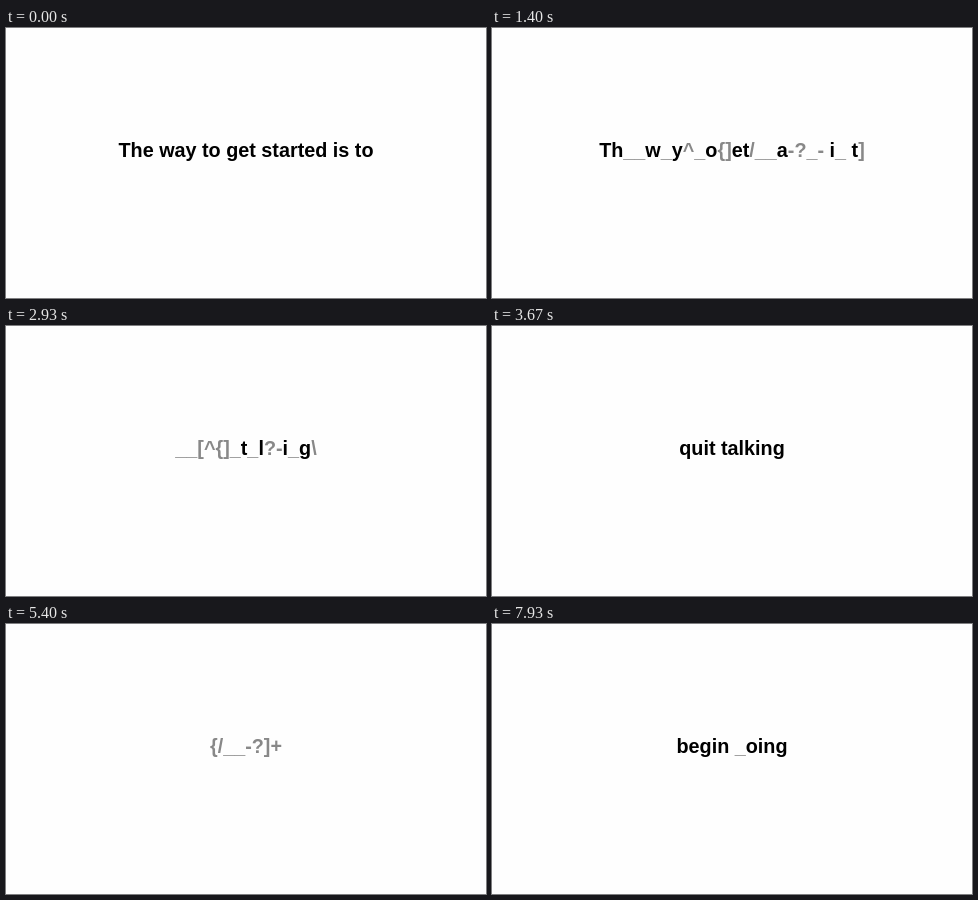
These frames come from a looping animation (480x270 px, 8 s). An HTML page:

```html
<!DOCTYPE html>
<html lang="en">
<head>
<meta charset="utf-8">
<title>Text scramble</title>
<style>
  html, body { margin: 0; width: 100%; height: 100%; overflow: hidden; background: #fefefe; }
  svg { display: block; width: 100vw; height: 100vh; }
  text { font: bold 19.8px "Liberation Sans", Arial, sans-serif; white-space: pre; fill: #000; }
  .dud { fill: #888; }
</style>
</head>
<body>
<svg viewBox="0 0 480 270"><text id="line" x="240" y="129" text-anchor="middle"></text></svg>
<script>
const LOOP = 8000;
const FPS = 15;
const TICKS = LOOP * FPS / 1000;
const EMPTY = /~/g;

// Key poses: the text is complete at tick `at`; its slots change one by one over the `over` ticks before.
// A tilde is an empty slot; `over: 0` only regroups the slots.
const poses = [
  { at: 0, over: 0, text: 'The way to get started is to' },
  { at: 21, over: 12, text: 'Th__w_y^_o{]et/__a-?_- i_ t]' },
  { at: 35, over: 14, text: '+___[_~^_>{]{_/__~-?_-?}_/\\~' },
  { at: 48, over: 13, text: '~~~~[~~^~~i]~_t~_~l~~}~i_g~~' },
  { at: 55, over: 7, text: '~~~~q~~u~~it~ t~a~l~~k~ing~~' },
  { at: 62, over: 0, text: 'quit talking' },
  { at: 77, over: 9, text: '_{[/__-_?]_+' },
  { at: 81, over: 3, text: '~{~/__-~?]~+' },
  { at: 89, over: 8, text: '~~~~a~n~~d~~' },
  { at: 95, over: 0, text: '~a~~n~~~d~~' },
  { at: 102, over: 1, text: '~+~~n~~~<~~' },
  { at: 110, over: 8, text: '{+_-?/_^<_]' },
  { at: 119, over: 8, text: 'begin _oing' }
];

const line = document.getElementById('line');
let shown = -1;

function noise(seed) {
  const x = Math.sin(seed * 127.1 + 11.7) * 43758.5453;
  return x - Math.floor(x);
}

// Slots that differ between two poses, in a seeded random order.
function changedSlots(a, b, seed) {
  const key = i => noise(i + seed * 31);
  return [...a].map((_, i) => i)
    .filter(i => a[i] !== b[i])
    .sort((i, j) => key(i) - key(j));
}

function textAt(tick) {
  const next = poses.findIndex(pose => pose.at > tick);
  if (next < 0) return poses[poses.length - 1].text;
  const { text: from } = poses[next - 1];
  const { at, over, text: to } = poses[next];
  const elapsed = tick - (at - over);
  if (elapsed <= 0) return from;
  const slots = changedSlots(from, to, next);
  const done = slots.slice(0, Math.floor(slots.length * elapsed / over));
  return [...from].map((char, i) => done.includes(i) ? to[i] : char).join('');
}

function makeSpan(text) {
  const span = document.createElementNS('http://www.w3.org/2000/svg', 'tspan');
  if (!/^[a-z ]/i.test(text)) span.setAttribute('class', 'dud');
  span.textContent = text;
  return span;
}

function render(ms) {
  // The small bias absorbs timestamps rounded to 10 ms.
  const tick = Math.floor((ms % LOOP) * FPS / 1000 + 0.1) % TICKS;
  if (tick === shown) return;
  shown = tick;
  const runs = textAt(tick).replace(EMPTY, '').match(/[a-z ]+|[^a-z ]+/gi) || [];
  line.replaceChildren(...runs.map(makeSpan));
}

const begin = performance.now();
function loop() {
  render(performance.now() - begin);
  requestAnimationFrame(loop);
}
loop();
</script>
</body>
</html>
```
